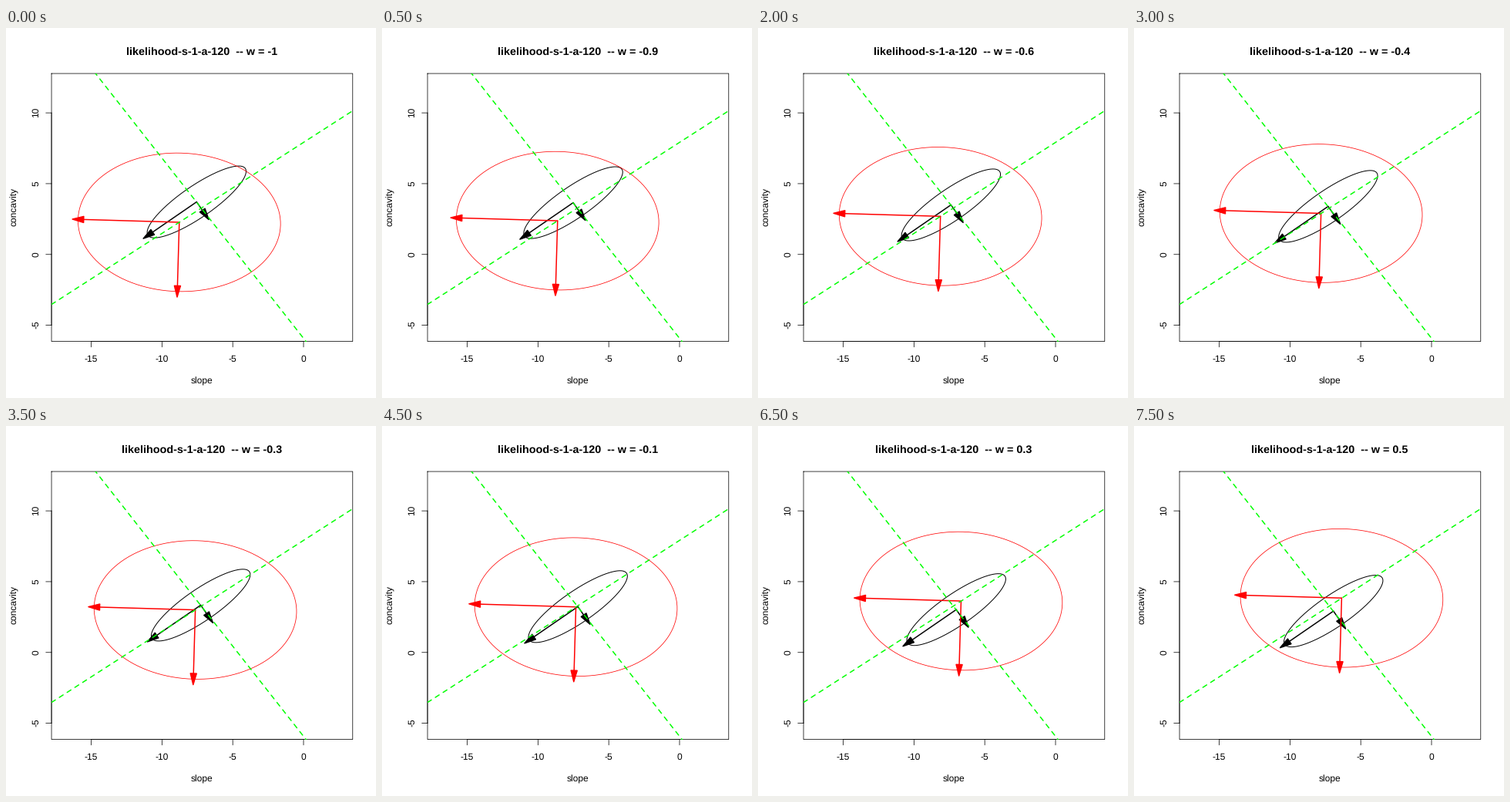
A matplotlib script for the animation above (8000 ms loop, 480 by 480 pixels).

```python
import numpy as np
import matplotlib.pyplot as plt
from matplotlib.animation import FuncAnimation
from matplotlib.patches import Polygon, Rectangle

SIZE, DPI = 480, 72
FRAMES, INTERVAL = 16, 500
LEFT, RIGHT, TOP, BOTTOM = 59.04, 449.76, 59.04, 406.56
MID_X, MID_Y = (LEFT + RIGHT) / 2, (TOP + BOTTOM) / 2
UNIT, X0, Y0 = 18.365, 386.0, 293.75
GREEN = "#00ff00"

plt.rcParams.update({
    "font.family": "Liberation Sans",
    "font.size": 12,
    "text.hinting": "none",
    "axes.unicode_minus": False,
})

fig = plt.figure(figsize=(SIZE / DPI, SIZE / DPI), dpi=DPI, facecolor="white")
ax = fig.add_axes([0, 0, 1, 1])
ax.set_xlim(0, SIZE)
ax.set_ylim(SIZE, 0)
ax.axis("off")


def label(x, y, s, angle=0, **kw):
    return ax.text(x, y, s, ha="center", va="baseline", rotation=angle,
                   rotation_mode="anchor", **kw)


def thin(xs, ys):
    ax.plot(xs, ys, color="black", lw=0.75, snap=False, zorder=1)


def draw_axes():
    thin([LEFT, RIGHT, RIGHT, LEFT, LEFT], [TOP, TOP, BOTTOM, BOTTOM, TOP])
    xs = [X0 + UNIT * v for v in (-15, -10, -5, 0)]
    ys = [Y0 - UNIT * v for v in (-5, 0, 5, 10)]
    thin([xs[0], xs[-1]], [BOTTOM, BOTTOM])
    thin([LEFT, LEFT], [ys[0], ys[-1]])
    for x, v in zip(xs, (-15, -10, -5, 0)):
        thin([x, x], [BOTTOM, BOTTOM + 7.2])
        label(x - 0.5, 433, str(v))
    for y, v in zip(ys, (-5, 0, 5, 10)):
        thin([LEFT - 7.2, LEFT], [y, y])
        label(42, y - 0.5, str(v), 90)
    label(MID_X, 462, "slope")
    label(14, MID_Y - 1, "concavity", 90)


def draw_guides():
    clip = Rectangle((LEFT, TOP), RIGHT - LEFT, BOTTOM - TOP,
                     transform=ax.transData)
    for xs, ys in (([LEFT, RIGHT], [358.6, 107.4]),
                   ([69.8, 446.8], [0, SIZE])):
        line, = ax.plot(xs, ys, color=GREEN, lw=1.5, dashes=(4, 4),
                        dash_capstyle="round", zorder=5)
        line.set_clip_path(clip)


# Arrowhead along +x, centred on the end of its shaft.
HEAD = np.array([[7.3, 0], [-7.3, 4.0], [-7.3, -4.0]])


class Region:
    """Ellipse with an arrow along each semi-axis."""

    def __init__(self, start, step, radii, tilt, color, width, z):
        self.start, self.step = np.array(start), np.array(step)
        a = np.radians(tilt)
        long_dir = np.array([-np.cos(a), np.sin(a)])
        short_dir = np.array([np.sin(a), np.cos(a)])
        t = np.linspace(0, 2 * np.pi, 241)[:, None]
        self.outline = (radii[0] * np.cos(t) * long_dir
                        + radii[1] * np.sin(t) * short_dir)
        self.curve, = ax.plot([], [], color=color, lw=width, zorder=z)
        self.arrows = []
        for r, d in zip(radii, (long_dir, short_dir)):
            shaft, = ax.plot([], [], color=color, lw=1.5, zorder=z + 0.1,
                             solid_capstyle="round")
            head = Polygon(HEAD, closed=True, fc=color, ec=color, lw=1.5,
                           joinstyle="round", zorder=z + 0.2)
            ax.add_patch(head)
            turn = np.array([d, [-d[1], d[0]]])
            self.arrows.append((shaft, head, r * d, HEAD @ turn))

    def move(self, i):
        c = self.start + i * self.step
        self.curve.set_data(*(c + self.outline).T)
        for shaft, head, reach, shape in self.arrows:
            shaft.set_data(*np.array([c, c + reach]).T)
            head.set_xy(c + reach + shape)


draw_axes()
draw_guides()
title = label(MID_X - 0.5, 35, "", fontsize=14.4, fontweight="bold")
regions = [
    Region((247.3, 225.6), (0.762, 0.968), (76.6, 20.5), 34.5, "black", 1, 2),
    Region((224.8, 252.0), (2.973, -1.92), (131.4, 89.8), -1.65, "red", 0.75, 3),
]


def update(i):
    w = (i - 10) / 10
    title.set_text(f"likelihood-s-1-a-120  -- w = {w:g}")
    for region in regions:
        region.move(i)
    return []


anim = FuncAnimation(fig, update, frames=FRAMES, interval=INTERVAL,
                     repeat=True, repeat_delay=0, blit=False)
plt.show()
```
